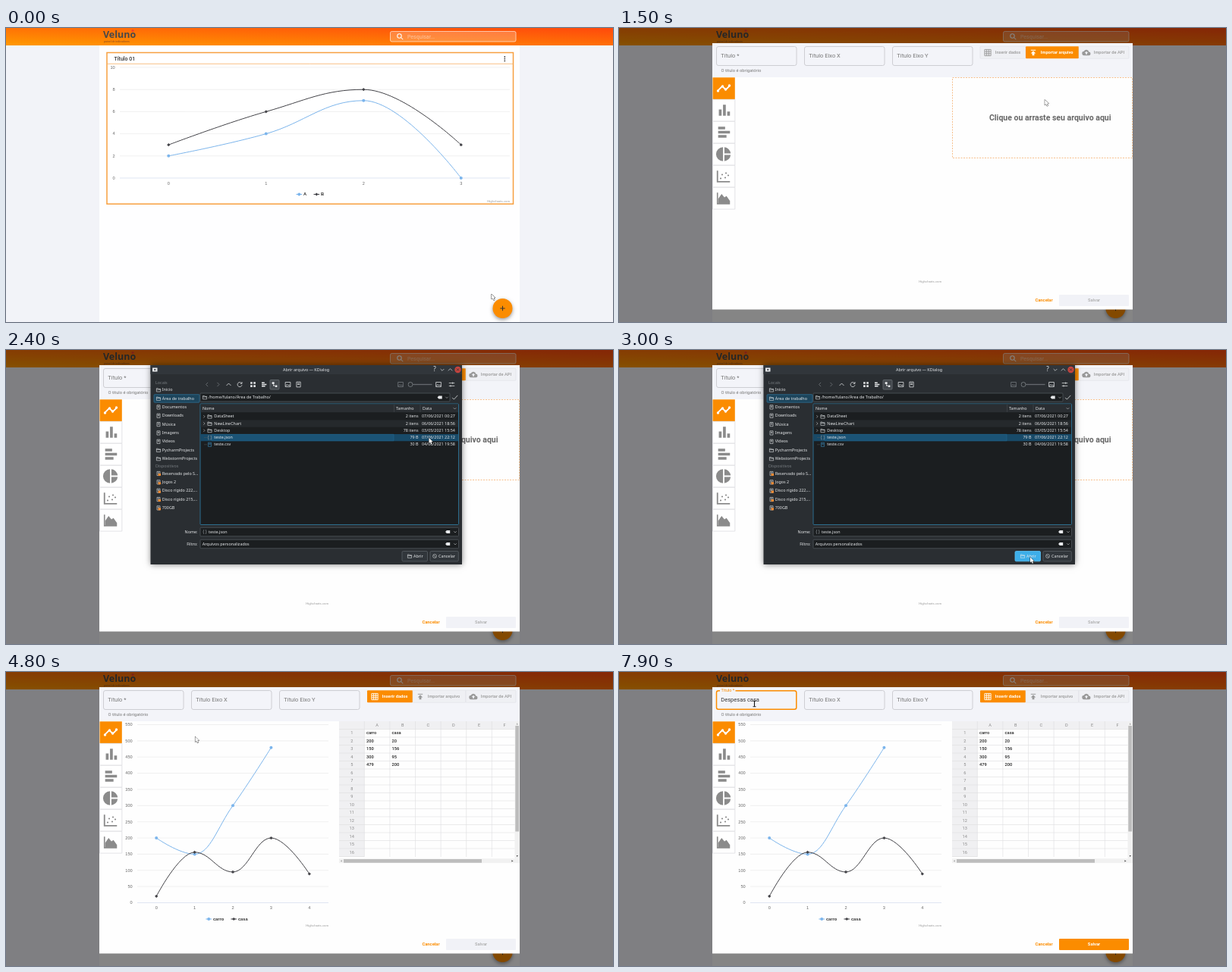
Write an HTML page with a canvas that moves like this. It is 800 by 388 pixels and loops after 8 s.

```html
<!DOCTYPE html>
<html lang="pt">
<head>
<meta charset="utf-8">
<title>Painel de gráficos</title>
<style>
  html, body { margin: 0; width: 100%; height: 100%; overflow: hidden; }
  canvas { display: block; }
</style>
</head>
<body>
<canvas id="stage" width="800" height="388"></canvas>
<script>
const ctx = document.getElementById('stage').getContext('2d');
const LOOP = 8000, STEP = 100;
const ORANGE = '#fb8c00', SERIES_COLORS = ['#7cb5ec', '#434348'];
const ROBOTO = 'Roboto, sans-serif', NOTO = '"Noto Sans", sans-serif', ARIAL = '"Liberation Sans", sans-serif';

const ICONS = {
  table: 'M3 3h18v18H3zM9 3v18M15 3v18M3 9h18M3 15h18',
  upload: 'M5 4h14v2H5zM5 14h4v6h6v-6h4l-7-7z',
  cloud: 'M19 10A7.5 7.5 0 0 0 5 8A6 6 0 0 0 6 20H19A5 5 0 0 0 19 10zM14 13v4h-4v-4H7l5-5 5 5z',
  bars: 'M5 11h4v9H5zM11 4h4v16h-4zM17 14h4v6h-4z',
  rows: 'M4 4h10v4H4zM4 10h17v4H4zM4 16h12v4H4z',
  pie: 'M11 2v20A10 10 0 0 1 11 2zM13 2v9h9A10 10 0 0 0 13 2zM13 13v9A10 10 0 0 0 22 13z',
  axes: 'M3 4v16h18',
  area: 'M4 19V13l5-7 4 5 3-2 5 7v3z',
  line: 'M3 16L10 9l5 5 6-6',
  left: 'M15 5l-7 7 7 7', right: 'M9 5l7 7-7 7', up: 'M4 16l8-8 8 8', down: 'M5 9l7 7 7-7',
  check: 'M3 13l6 6L22 5',
  refresh: 'M19 8a8 8 0 1 0 1 6M20 3v6h-6',
  search: 'M15 15l6 6M16 9.500a6.500 6.500 0 1 1-13 0a6.500 6.500 0 0 1 13 0',
  folder: 'M3 5h7l2 3h9v12H3zM3 10h18',
  page: 'M5 3h14v18H5zM8 8h8M8 12h8',
  braces: 'M9 3H6v7l-3 2 3 2v7h3M15 3h3v7l3 2-3 2v7h-3',
  erase: 'M8 5h15v14H8L2 12z',
  picture: 'M3 4h18v16H3zM4 18l5-6 4 4 3-3 4 5',
  ban: 'M21 12a9 9 0 1 1-18 0a9 9 0 0 1 18 0M6 6l12 12',
  tiles: 'M3 3h7v7H3zM14 3h7v7h-7zM3 14h7v7H3zM14 14h7v7h-7z',
  tree: 'M3 3h8v7H3zM14 14h7v7h-7zM7 10v7h7',
  sliders: 'M2 7h20M2 17h20M15 4v6M8 14v6'
};

function rect(x, y, w, h, fill, stroke, radius = 0, lineWidth = .8) {
  ctx.beginPath();
  ctx.roundRect(x, y, w, h, radius);
  if (fill) { ctx.fillStyle = fill; ctx.fill(); }
  if (stroke) { ctx.strokeStyle = stroke; ctx.lineWidth = lineWidth; ctx.stroke(); }
}
function circle(x, y, r, fill) {
  ctx.beginPath();
  ctx.arc(x, y, r, 0, 7);
  ctx.fillStyle = fill;
  ctx.fill();
}
function line(x1, y1, x2, y2, color, width = .6) {
  ctx.beginPath();
  ctx.moveTo(x1, y1);
  ctx.lineTo(x2, y2);
  ctx.strokeStyle = color;
  ctx.lineWidth = width;
  ctx.stroke();
}
function text(s, x, y, size, color, align = 'left', weight = 400, family = ROBOTO) {
  ctx.font = `${weight} ${size}px ${family}`;
  ctx.textAlign = align;
  ctx.textBaseline = 'middle';
  ctx.fillStyle = color;
  ctx.fillText(s, x, y);
}
// Icons live on a 24-unit grid; a stroke width of 0 means filled.
function icon(name, x, y, size, color, stroke = 0) {
  ctx.save();
  ctx.translate(x - size / 2, y - size / 2);
  ctx.scale(size / 24, size / 24);
  const path = new Path2D(ICONS[name]);
  ctx.fillStyle = ctx.strokeStyle = color;
  ctx.lineWidth = stroke;
  if (stroke) ctx.stroke(path); else ctx.fill(path, 'evenodd');
  ctx.restore();
}

// Smoothed spline that never overshoots its neighbours.
function spline(points) {
  ctx.beginPath();
  ctx.moveTo(...points[0]);
  let handle = points[0];
  for (let i = 1; i < points.length; i++) {
    const [x, y] = points[i], [px, py] = points[i - 1], next = points[i + 1];
    let lx = x, ly = y, rx = x, ry = y;
    if (next) {
      const [nx, ny] = next;
      lx = (1.5 * x + px) / 2.5; ly = (1.5 * y + py) / 2.5;
      rx = (1.5 * x + nx) / 2.5; ry = (1.5 * y + ny) / 2.5;
      const shift = (ry - ly) * (rx - x) / (rx - lx) + y - ry;
      ly += shift; ry += shift;
      const clamp = (v, other) => Math.min(Math.max(v, Math.min(other, y)), Math.max(other, y));
      ly = clamp(ly, py); ry = 2 * y - ly;
      ry = clamp(ry, ny); ly = 2 * y - ry;
    }
    ctx.bezierCurveTo(...handle, lx, ly, x, y);
    handle = [rx, ry];
  }
  ctx.stroke();
}
function marker(x, y, index) {
  if (!index) return circle(x, y, 2, SERIES_COLORS[0]);
  ctx.beginPath();
  for (const [dx, dy] of [[0, -2.1], [2.1, 0], [0, 2.1], [-2.1, 0]]) ctx.lineTo(x + dx, y + dy);
  ctx.fillStyle = SERIES_COLORS[1];
  ctx.fill();
}
function chart({ left, right, top, bottom, max, step, count, series, legend, legendY, reveal = 1 }) {
  const yOf = v => bottom - v * (bottom - top) / max;
  const xOf = i => left + (i + .5) * (right - left) / count;
  for (let v = 0; v <= max; v += step) {
    line(left, yOf(v), right, yOf(v), v ? '#e6e6e6' : '#ccd6eb');
    text(v, left - 6.3, yOf(v) + .3, 5.6, '#666', 'right', 400, ARIAL);
  }
  for (let i = 0; i < count; i++) text(i, xOf(i), bottom + 7, 5.6, '#666', 'center', 400, ARIAL);
  ctx.save();
  ctx.beginPath();
  ctx.rect(left, top - 5, (right - left) * reveal, bottom - top + 10);
  ctx.clip();
  series.forEach(({ values }, s) => {
    const points = values.map((v, i) => [xOf(i), yOf(v)]);
    ctx.strokeStyle = SERIES_COLORS[s];
    ctx.lineWidth = 1;
    spline(points);
    for (const [x, y] of points) marker(x, y, s);
  });
  ctx.restore();
  series.forEach(({ name }, s) => {
    line(legend[s] - 3.8, legendY, legend[s] + 3.8, legendY, SERIES_COLORS[s], 1);
    marker(legend[s], legendY, s);
    text(name, legend[s] + 5.7, legendY + .3, 5.7, '#333', 'left', 700, ARIAL);
  });
}
const credits = (x, y) => text('Highcharts.com', x, y, 4.3, '#999', 'right', 400, ARIAL);

function drawPage() {
  rect(0, 0, 800, 388, '#f2f3f8');
  rect(123, 23, 554, 365, '#fefeff');
  const header = ctx.createLinearGradient(399.3, 34.5, 400.7, -11.5);
  header.addColorStop(0, '#ff9800');
  header.addColorStop(1, '#ff4a0c');
  rect(0, 0, 800, 23, header);
  text('Veluno', 128, 10, 12.5, '#484848', 'left', 700, '"Open Sans", sans-serif');
  circle(167, 3.5, 1.6, '#f0402c');
  text('painel de indicadores', 129, 17.8, 3.6, '#8a4a20');
  rect(506.5, 4.5, 165.500, 13.5, 'rgba(255,255,255,.22)', 'rgba(255,255,255,.75)', 2);
  icon('search', 519.5, 11.5, 10, '#fff', 2.5);
  text('Pesquisar...', 529, 11.7, 7, 'rgba(255,255,255,.5)');

  rect(133, 32.5, 535.5, 199.7, '#fff', '#f7a040', 0, 1.5);
  line(133, 47.3, 668.5, 47.3, '#f7b068', .8);
  text('Título 01', 142.5, 40.5, 7, '#333', 'left', 500);
  for (const y of [38, 40.7, 43.4]) circle(657.3, y, .9, '#444');
  chart({
    left: 150, right: 664, top: 52, bottom: 198, max: 10, step: 2, count: 4,
    series: [{ name: 'A', values: [2, 4, 7, 0] }, { name: 'B', values: [3, 6, 8, 3] }],
    legend: [386.3, 409.3], legendY: 219.5
  });
  credits(664, 228.7);

  ctx.save();
  ctx.shadowColor = 'rgba(0,0,0,.4)';
  ctx.shadowBlur = 5;
  ctx.shadowOffsetY = 2;
  circle(654.5, 370, 13, ORANGE);
  ctx.restore();
  line(651.3, 370, 657.7, 370, '#333', 1);
  line(654.5, 366.8, 654.5, 373.2, '#333', 1);
}

function drawField(x, label) {
  rect(x + .5, 24.5, 105.5, 25, null, '#c4c5ca', 2.5);
  text(label, x + 6.3, 37, 7.5, '#777');
}
function drawTitleField({ focused, title, caret }) {
  if (!focused) drawField(128, 'Título *');
  else {
    rect(128.5, 24.7, 105.3, 24.6, null, ORANGE, 2.5, 1.5);
    rect(133, 22, 20.500, 5, '#f3f4f9');
    text('Título *', 134.5, 24.2, 5.5, ORANGE);
    text(title || 'Título', 134.3, 37, 7.5, title ? '#333' : '#aaa');
    ctx.font = `400 7.5px ${ROBOTO}`;
    const x = 134.6 + ctx.measureText(title).width;
    if (caret) line(x, 32.3, x, 41.3, '#222', .8);
  }
  text('O título é obrigatório', 134.5, 56.2, 5.8, '#777');
}
function drawSourceTabs(active) {
  [['Inserir dados', 'table', 476, 60], ['Importar arquivo', 'upload', 536, 70], ['Importar de API', 'cloud', 606, 66]]
    .forEach(([label, glyph, x, w], i) => {
      const on = i === active, color = on ? '#fff' : '#999';
      rect(x, 24.3, w, 16, on ? ORANGE : '#eff0f4', on ? null : '#dedfe4', 1, .6);
      icon(glyph, x + 10, 32.5, 11, color, i ? 0 : 2);
      text(label, x + 19.8, 32.7, 5.7, color, 'left', on ? 700 : 500);
    });
}
function drawChartTypes() {
  ['line', 'bars', 'rows', 'pie', 'axes', 'area'].forEach((name, i) => {
    const y = 65 + 29 * i, cy = y + 14.5, color = i ? '#8b8b8b' : '#fff';
    rect(123.5, y + .3, 29.3, 28.8, i ? '#fff' : ORANGE, i ? '#dcdce0' : null);
    icon(name, 138, cy, 22, color, name === 'line' || name === 'axes' ? 2 : 0);
    if (name === 'line')
      for (const [dx, dy] of [[-7.5, 3.5], [-1.5, -2.5], [2.5, 1.5], [7.500, -3.5]]) circle(138 + dx, cy + dy, 1.7, color);
    if (name === 'axes')
      for (const [dx, dy] of [[-4, 3], [-2, -2], [2, 2], [3, -4], [6, -1]]) circle(138 + dx, cy + dy, 1.1, color);
    if (name === 'area') icon('axes', 138, cy, 22, color, 1.8);
  });
}
function triangle(x, y, dx, dy, color) {
  ctx.beginPath();
  ctx.moveTo(x + dx, y + dy);
  ctx.lineTo(x - dx + dy, y - dy + dx);
  ctx.lineTo(x - dx - dy, y - dy - dx);
  ctx.fillStyle = color;
  ctx.fill();
}
function drawSheet(table) {
  const colX = i => 472.3 + 33.6 * i, rowY = i => 75.5 + 10.5 * i;
  ctx.save();
  ctx.beginPath();
  ctx.rect(439, 65, 238, 188);
  ctx.clip();
  rect(439, 65, 238, 10.5, '#f0f0f2');
  rect(439, 65, 33.3, 179, '#f0f0f2');
  for (let i = 0; i < 7; i++) {
    line(colX(i), 65, colX(i), i ? 233 + (table ? 11 : 0) : 244, '#dddde0');
    if (i < 6) text('ABCDEF'[i], colX(i) + 16.8, 70.7, 5.6, '#888', 'center');
  }
  for (let i = 0; i < 17; i++) {
    line(439, rowY(i), i < 16 ? 674 : 472, rowY(i), '#dddde0');
    if (i < (table ? 16 : 15)) text(i + 1, 455.7, rowY(i) + 5.2, 5.6, '#888', 'center');
  }
  if (!table) {
    line(451.5, 238, 459.5, 238, '#777', .9);
    line(455.5, 234, 455.5, 242, '#777', .9);
  }
  (table || []).forEach((row, r) => row.forEach((cell, c) =>
    text(cell, colX(c) + 2.7, rowY(r) + 5, 5.7, '#222', 'left', 500)));
  rect(439, 246.300, 238, 6, '#f1f1f1');
  rect(445, 247, table ? 182 : 218.5, 4.7, '#bdbdbd');
  triangle(441.8, 249.4, -1.1, 0, '#a3a3a3');
  triangle(table ? 667.5 : 673.5, 249.4, 1.1, 0, '#444');
  if (table) {
    rect(670.5, 65, 6.5, 181.3, '#f1f1f1');
    rect(671.3, 71, 4.8, 139.5, '#bdbdbd');
    triangle(673.7, 68.3, 0, -1.1, '#a3a3a3');
    triangle(673.7, 243, 0, 1.1, '#444');
  }
  ctx.restore();
}
function drawDropZone() {
  ctx.save();
  ctx.setLineDash([2, 1.5]);
  rect(439.5, 65.5, 237, 106, null, '#f5b070');
  ctx.restore();
  text('Clique ou arraste seu arquivo aqui', 648.5, 118.5, 10.5, '#666', 'right', 700);
}

const TABLE = [['carro', 'casa'], [200, 20], [150, 156], [300, 95], [479, 200]];
function drawModal(state) {
  rect(123, 20, 554, 351.5, '#fefefe');
  rect(123, 20, 554, 45, '#f3f4f9');
  drawTitleField(state);
  drawField(244, 'Título Eixo X');
  drawField(360, 'Título Eixo Y');
  drawSourceTabs(state.importing ? 1 : 0);
  drawChartTypes();
  if (state.importing) drawDropZone(); else drawSheet(state.loaded && TABLE);
  if (state.loaded) chart({
    left: 173, right: 425, top: 69.5, bottom: 304.5, max: 550, step: 50, count: 5,
    series: [{ name: 'carro', values: [200, 150, 300, 479] }, { name: 'casa', values: [20, 156, 95, 200, 89] }],
    legend: [267.2, 300.2], legendY: 326, reveal: state.reveal
  });
  credits(425, 334.8);
  text('Cancelar', 560, 359.5, 5.8, ORANGE, 'center', 700);
  rect(580, 352, 92, 15, state.title ? ORANGE : '#f1f2f7', null, 1);
  text('Salvar', 626, 359.7, 5.8, state.title ? '#fff' : '#aaa', 'center', state.title ? 700 : 500);
}

const PLACES = ['Início', 'Área de trabalho', 'Documentos', 'Downloads', 'Música', 'Imagens', 'Vídeos', 'PycharmProjects', 'WebstormProjects'];
const DEVICES = ['Reservado pelo S...', 'Jogos 2', 'Disco rígido 222,...', 'Disco rígido 215,...', '700GB'];
const FILES = [
  ['DataSet', '2 itens', '07/06/2021 00:27'].map(s => s.replace('Set', 'Sheet')),
  ['NewLineChart', '2 itens', '06/06/2021 18:56'],
  ['Desktop', '78 itens', '03/05/2021 15:54'],
  ['teste.json', '79 B', '07/06/2021 22:12'],
  ['teste.csv', '30 B', '04/06/2021 19:58']
];
function drawFileDialog({ selected, pressed, devices }) {
  const LIGHT = '#e6e8ea', DIM = '#777c80', VIEW = '#1b1e20', BLUE = '#2f7fa8';
  const label = (s, x, y, color = LIGHT, align) => text(s, x, y, 5.4, color, align, 400, NOTO);
  const glyph = (name, x, y, color = LIGHT, size = 8) => icon(name, x, y, size, color, 2);

  ctx.save();
  ctx.shadowColor = 'rgba(0,0,0,.5)';
  ctx.shadowBlur = 8;
  rect(190.5, 20, 410.5, 263, '#2a2e32');
  ctx.restore();
  rect(190.5, 20, 410.5, 12, '#31363b');
  label('Abrir arquivo — KDialog', 395.5, 26, LIGHT, 'center');
  rect(193, 23.5, 6.500, 5, '#e8eaec');
  rect(195, 25.3, 2.5, 1.5, '#31363b');
  text('?', 565, 26, 8, LIGHT, 'center', 400, NOTO);
  glyph('down', 575, 26);
  glyph('up', 585.5, 26);
  circle(595.5, 26, 4.2, '#c8443e');
  line(593.8, 24.3, 597.2, 27.7, '#31363b', .8);
  line(597.2, 24.3, 593.8, 27.7, '#31363b', .8);

  [['left', 265, DIM], ['right', 279.5, DIM], ['up', 293.5], ['refresh', 308]]
    .forEach(([name, x, color]) => glyph(name, x, 45.5, color, 9));
  rect(348, 39.5, 12, 12.5, '#42474c', '#6a7075', 1);
  icon('tiles', 325.5, 45.5, 9, LIGHT);
  icon('rows', 340, 45.5, 9, LIGHT);
  icon('tree', 354, 45.7, 9, LIGHT);
  glyph('picture', 371.5, 45.5, LIGHT, 9);
  glyph('page', 385.5, 45.5, LIGHT, 9);
  glyph('picture', 520, 45.5, DIM, 9);
  line(533, 45.5, 561.5, 45.5, '#64696e', 1.3);
  circle(533, 45.5, 3.2, '#7d8286');
  circle(533, 45.5, 2.5, '#2a2e32');
  glyph('picture', 570, 45.5, LIGHT, 9);
  glyph('sliders', 587.5, 45.5, LIGHT, 9);

  rect(256, 57, 329, 11, VIEW, '#50565b', 1);
  glyph('folder', 262, 62.5, LIGHT, 7);
  label('/home/fulano/Área de Trabalho/', 267, 62.5);
  icon('erase', 571.5, 62.5, 7, LIGHT);
  glyph('down', 581, 62.5, LIGHT, 6);
  glyph('check', 591.5, 62.5, LIGHT, 9);

  label('Locais', 197, 43.5, DIM);
  rect(195, 58.700, 60, 10.5, '#1d455c', BLUE, 1, .6);
  PLACES.forEach((name, i) => {
    const y = 52.7 + 11.35 * i;
    glyph(i > 1 && i < 7 ? 'page' : 'folder', 201, y, LIGHT, 7);
    label(name, 205.7, y);
  });
  label('Dispositivos', 197, 153.7, DIM);
  ctx.save();
  ctx.globalAlpha = devices;
  DEVICES.forEach((name, i) => {
    const y = 163 + 11.35 * i;
    glyph('page', 201, y, LIGHT, 7);
    rect(200.5, y, 3.5, 3, '#f08a32');
    label(name, 205.7, y);
  });
  ctx.restore();

  rect(256, 71, 340.5, 159.5, VIEW, BLUE, 1);
  rect(256.5, 71.500, 339.5, 10.8, '#2a2e32');
  [['Nome', 259], ['Tamanho', 514], ['Data', 549]].forEach(([s, x]) => label(s, x, 77));
  for (const x of [511.5, 546]) line(x, 72, x, 82, '#454a4e');
  glyph('down', 591.5, 77, LIGHT, 6);
  FILES.forEach(([name, size, date], i) => {
    const y = 87.8 + 9.25 * i, folder = i < 3;
    if (i % 2) rect(256.5, y - 4.6, 339.5, 9.25, i === 3 && selected ? '#184a68' : i === 3 ? '#2b3034' : '#25292c');
    if (i === 3 && selected) rect(271, y - 4.3, 240, 8.6, '#1b5375', '#2672a0', 0, .4);
    if (folder) glyph('right', 261, y, LIGHT, 6);
    else line(261, y, 265, y, '#555', .5);
    glyph(folder ? 'folder' : i === 3 ? 'braces' : 'page', 268.5, y, i === 4 ? '#3d8fc0' : folder ? LIGHT : '#9aa0a4', 7);
    label(name, 274.3, y);
    label(size, 543.5, y, LIGHT, 'right');
    label(date, 548, y);
  });

  label('Nome:', 252.5, 240, LIGHT, 'right');
  rect(256, 234.3, 340.5, 11.5, VIEW, selected ? '#50565b' : BLUE, 1);
  if (selected) {
    glyph('braces', 262, 240, '#9aa0a4', 6.5);
    label('teste.json', 267, 240);
    icon('erase', 582, 240, 7, LIGHT);
  } else line(259.3, 236.5, 259.3, 243.500, LIGHT);
  glyph('down', 592, 240, LIGHT, 6);
  label('Filtro:', 252.5, 256, LIGHT, 'right');
  rect(256, 250.3, 340.5, 11.5, VIEW, '#50565b', 1);
  label('Arquivos personalizados', 258.7, 256);
  icon('erase', 582, 256, 7, LIGHT);
  glyph('down', 592, 256, LIGHT, 6);

  rect(522, 265.500, 33.5, 13.3, pressed ? '#3daee9' : '#31363b', pressed ? '#5cc0f2' : '#5a6065', 1.5);
  glyph('folder', 532, 272, LIGHT, 7);
  label('Abrir', 537, 272);
  rect(559, 265.5, 37.3, 13.3, '#31363b', '#5a6065', 1.5);
  glyph('ban', 565, 272, LIGHT, 6.5);
  label('Cancelar', 570, 272);
}

// Pointer stops: time, x, y.
const POINTER = [[0, 640, 351], [200, 652, 367], [400, 652, 367], [700, 643, 350], [900, 643, 350],
  [1300, 572, 34], [1600, 557.5, 116], [2600, 557.5, 116], [2900, 542, 273.500], [3900, 542, 273.5],
  [4400, 380, 165], [4500, 380, 165], [5000, 178.5, 42]];
function pointerAt(t) {
  const i = POINTER.findIndex(stop => stop[0] > t);
  if (i < 0) return POINTER.at(-1).slice(1);
  const [t0, x0, y0] = POINTER[i - 1], [t1, x1, y1] = POINTER[i];
  const p = (t - t0) / (t1 - t0), e = p * p * (3 - 2 * p);
  return [x0 + (x1 - x0) * e, y0 + (y1 - y0) * e];
}
function drawPointer(t) {
  const [x, y] = pointerAt(t);
  if (t >= 5000) {
    line(x, y - 3.5, x, y + 3.5, '#111', 1.1);
    for (const dy of [-3.7, 3.7]) line(x - 2, y + dy, x + 2, y + dy, '#111', .9);
    return;
  }
  ctx.beginPath();
  for (const [dx, dy] of [[0, 0], [0, 7], [1.6, 5.6], [2.8, 8.3], [4, 7.8], [2.9, 5.2], [5, 5]]) ctx.lineTo(x + dx, y + dy);
  ctx.closePath();
  ctx.fillStyle = '#fff';
  ctx.strokeStyle = '#222';
  ctx.lineWidth = .9;
  ctx.stroke();
  ctx.fill();
}

const ramp = (t, from, to) => Math.min(1, Math.max(0, (t - from) / (to - from)));
const blink = elapsed => elapsed % 600 < 300;

function draw(t) {
  drawPage();
  const open = ramp(t, 300, 600);
  if (open) {
    rect(0, 0, 800, 388, `rgba(0,0,0,${.48 * open})`);
    const typing = t >= 5500 && t < 6300;
    const zoom = .7 + .3 * open;
    ctx.save();
    ctx.globalAlpha = open;
    ctx.translate(400, 195.7);
    ctx.scale(zoom, zoom);
    ctx.translate(-400, -195.7);
    drawModal({
      focused: t < 1300 || t >= 5000,
      title: 'Despesas casa'.slice(0, Math.ceil(ramp(t, 5400, 6300) * 13)),
      caret: typing || blink(t < 1300 ? t - 600 : t < 5500 ? t - 5000 : t - 6300),
      importing: t >= 1300 && t < 3300,
      loaded: t >= 3300,
      reveal: ramp(t, 3200, 3600)
    });
    ctx.restore();
  }
  if (t >= 1800 && t < 3200)
    drawFileDialog({ selected: t >= 2300, pressed: t >= 2900, devices: .15 + .85 * ramp(t, 1800, 2200) });
  drawPointer(t);
}

function tick(now) {
  draw(Math.floor(now % LOOP / STEP) * STEP);
  requestAnimationFrame(tick);
}
requestAnimationFrame(tick);
</script>
</body>
</html>
```
